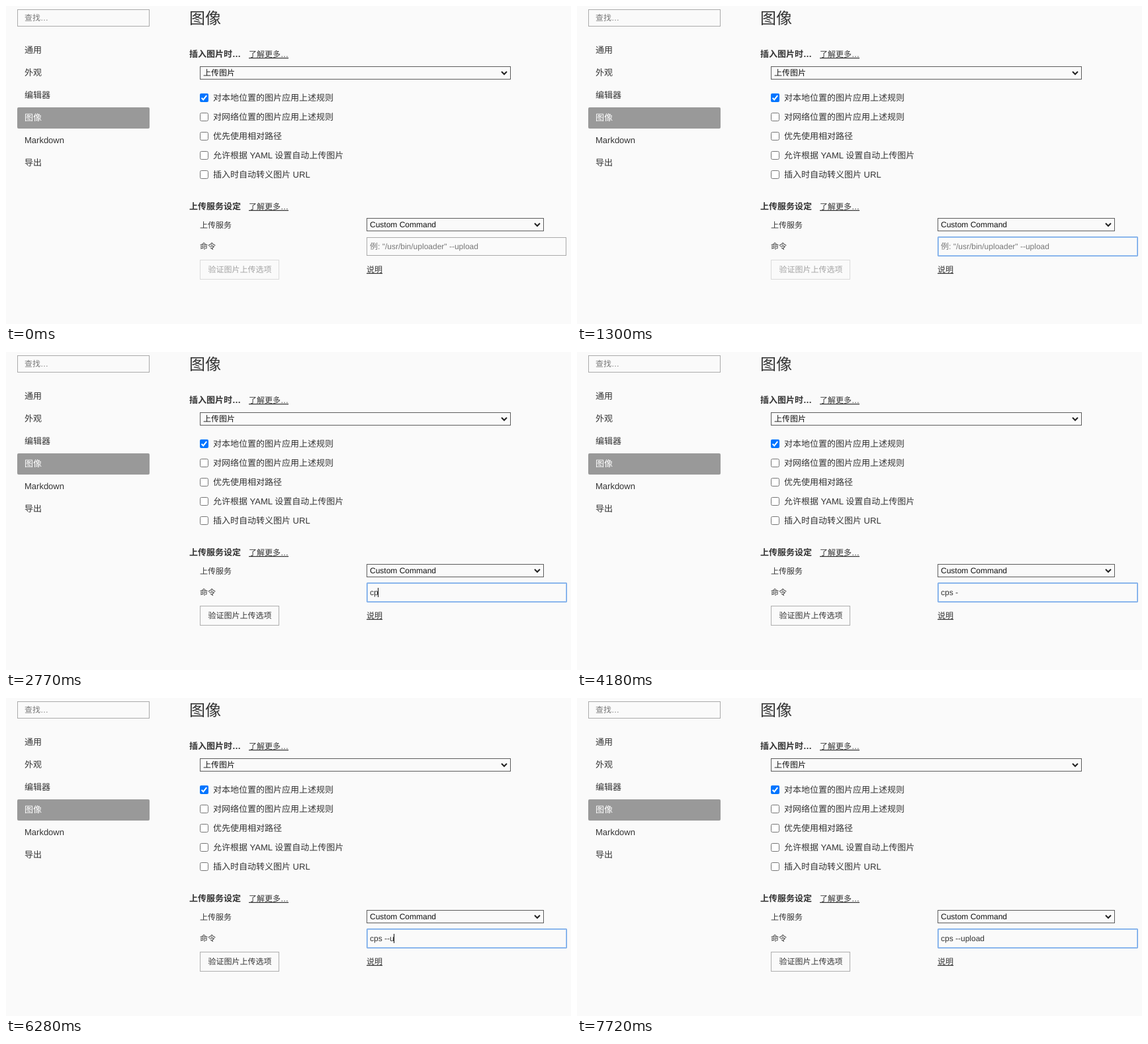
Recreate the animation shown at these times as an HTML page. Size 854 by 480 pixels, loop 8 s.

```html
<!DOCTYPE html>
<html lang="zh-CN">
<head>
<meta charset="utf-8">
<title>图像</title>
<style>
html, body { margin: 0; width: 100%; height: 100%; overflow: hidden; background: #fafafa; }
svg { display: block; }
text {
  font: 12px "Liberation Sans", "Noto Sans CJK SC", "Noto Sans CJK", sans-serif;
  fill: #333;
  white-space: pre;
  text-rendering: geometricPrecision;
}
.m { font-size: 13px; }
.title { font-size: 24px; }
.bold { font-size: 13px; font-weight: bold; }
.link { text-decoration: underline; }
.hint { fill: #777; }
.white { fill: #fff; }
.ink { fill: #111; }
.frame { fill: none; stroke: #aaa; }
.select { fill: none; stroke: #5c5c5c; }
.box { fill: #fff; stroke: #767676; }
.arrow { fill: none; stroke: #222; stroke-width: 2; }
.off text { fill: #a3a3a3; }
.off rect { stroke: #dadada; }
</style>
</head>
<body>
<svg id="stage" width="854" height="480" viewBox="0 0 854 480">
  <rect class="frame" x="17.5" y="5.5" width="199" height="25"/>
  <rect x="17" y="153" width="200" height="32" rx="2" fill="#999"/>
  <g id="labels"></g>
  <rect class="select" x="293.5" y="91.5" width="469" height="19"/>
  <path class="arrow" d="M749 99l4 4 4-4"/>
  <rect class="select" x="545.5" y="320.5" width="267" height="19"/>
  <path class="arrow" d="M799 328l4 4 4-4"/>
  <g id="button">
    <rect class="frame" x="293.5" y="383.5" width="119" height="29" style="stroke-opacity:.95"/>
    <text x="305.5" y="402">验证图片上传选项</text>
  </g>
  <rect id="idle" class="frame" x="545.5" y="349.5" width="301" height="27"/>
  <g id="focus" fill="none">
    <rect x="546.5" y="349.5" width="300" height="27" stroke="#a9caf3"/>
    <rect x="545.5" y="348.5" width="302" height="29" rx=".5" stroke="#6ca2e6"/>
  </g>
  <text id="hint" class="hint" x="550" y="367">例: "/usr/bin/uploader" --upload</text>
  <text id="typed" x="550" y="367"></text>
  <rect id="caret" y="356" width="1" height="14" fill="#111"/>
</svg>
<script>
const $ = id => document.getElementById(id);
const LOOP = 8000, FOCUS = 1090;

function add(tag, attrs, content = '') {
  const el = document.createElementNS('http://www.w3.org/2000/svg', tag);
  for (const key in attrs) el.setAttribute(key, attrs[key]);
  el.textContent = content;
  $('labels').append(el);
}
const label = (x, y, content, cls = '') => add('text', { x, y, class: cls }, content);

label(28, 22, '查找…', 'hint');
['通用', '外观', '编辑器', '图像', 'Markdown', '导出'].forEach((name, i) =>
  label(28, 71 + 34 * i, name, i === 3 ? 'm white' : 'm'));

label(277, 27, '图像', 'title');
label(277, 77, '插入图片时…', 'bold');
label(367, 77, '了解更多…', 'link');
label(298, 105, '上传图片', 'ink');

['对本地位置的图片应用上述规则', '对网络位置的图片应用上述规则', '优先使用相对路径',
 '允许根据 YAML 设置自动上传图片', '插入时自动转义图片 URL'].forEach((rule, i) => {
  const y = 132 + 29 * i;
  if (i) {
    add('rect', { class: 'box', x: 293.5, y: y + .5, width: 12, height: 12, rx: 2 });
  } else {
    add('rect', { x: 293, y, width: 13, height: 13, rx: 2, fill: '#0075ff' });
    add('path', { d: 'M295.6 138.8l2.6 2.6 5-6.2', fill: 'none', stroke: '#fff', 'stroke-width': 2 });
  }
  label(313, y + 11, rule, 'm');
});

label(277, 307, '上传服务设定', 'bold');
label(367, 307, '了解更多…', 'link');
label(293, 335, '上传服务');
label(550, 334, 'Custom Command', 'ink');
label(293, 367, '命令');
label(545, 402, '说明', 'link');

// [start in ms, field text, caret visible]
const steps = [
  [0, '', 0], [FOCUS, '', 1], [1300, '', 0],
  [1810, 'c', 1], [2260, 'c', 0], [2770, 'cp', 1], [2860, 'cps', 1], [3250, 'cps ', 1],
  [3730, 'cps -', 1], [4180, 'cps -', 0],
  [4690, 'cps -=', 1], [4870, 'cps -=', 0], [5410, 'cps -', 1],
  [5440, 'cps --', 1], [5770, 'cps --', 0],
  [6280, 'cps --u', 1], [6370, 'cps --up', 1], [6610, 'cps --upl', 1],
  [6910, 'cps --uplo', 1], [7180, 'cps --uploa', 1],
  [7420, 'cps --upload', 1], [7720, 'cps --upload', 0]
];

const show = (id, on) => $(id).setAttribute('visibility', on ? 'visible' : 'hidden');

function draw(t) {
  const [, value, caret] = steps.findLast(step => step[0] <= t);
  const focused = t >= FOCUS;
  $('typed').textContent = value;
  const width = value ? $('typed').getComputedTextLength() : 0;
  $('caret').setAttribute('x', 550 + Math.floor(width + .05));
  $('button').setAttribute('class', value ? '' : 'off');
  show('caret', caret);
  show('hint', !value);
  show('focus', focused);
  show('idle', !focused);
}

const start = performance.now();
function tick() {
  draw((performance.now() - start) % LOOP);
  requestAnimationFrame(tick);
}
tick();
</script>
</body>
</html>
```
